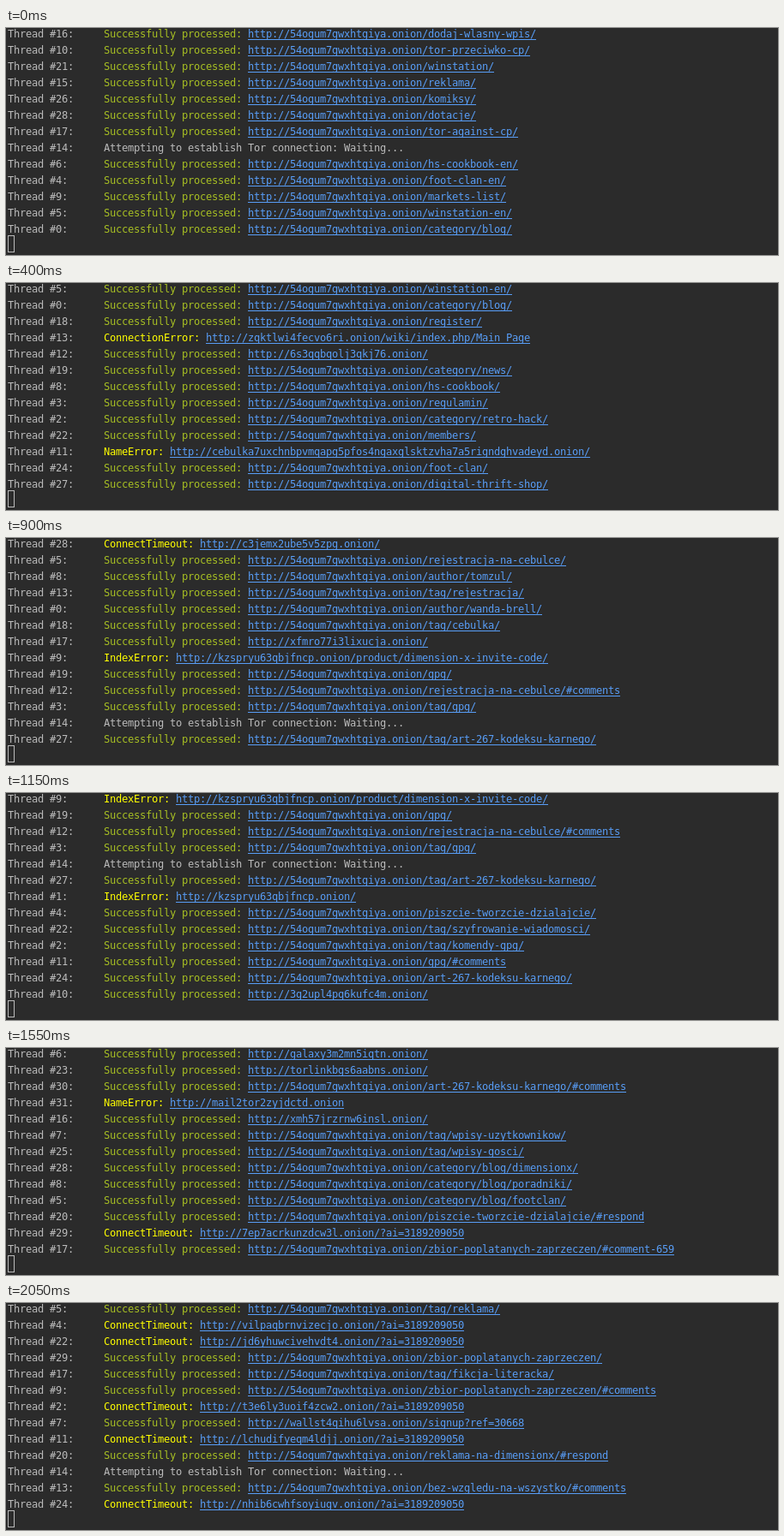
An HTML page that plays this animation: 900x265 px, repeating every 2100 ms.

```html
<!DOCTYPE html>
<html lang="en">
<head>
<meta charset="utf-8">
<title>Crawler log</title>
<style>
  html, body { margin: 0; width: 100%; height: 100%; overflow: hidden; background: #2b2b2b; }
  #screen { position: absolute; left: 0; top: 0; width: 900px; height: 247px; overflow: hidden; }
  #log {
    position: absolute; left: 2px; top: 0;
    font: 12px/14px "DejaVu Sans Mono", monospace;
    letter-spacing: calc(7px - 1ch); /* 7px terminal cells */
    font-variant-ligatures: none;
    white-space: pre; color: #bbb;
  }
  .row { height: 19px; }
  .ok { color: #a8c023; }
  .error { color: #ff0; }
  .link {
    color: #589df6;
    text-decoration: underline 1px;
    text-underline-offset: 2px;
    text-decoration-skip-ink: none;
  }
  #cursor {
    position: absolute; left: 2px; top: 242px; width: 8px; height: 20px;
    box-sizing: border-box; border: 1px solid #bbb;
  }
</style>
</head>
<body>
<div id="screen"><div id="log"></div></div>
<div id="cursor"></div>
<script>
  const ROW = 19, TICK = 50, LOOP = 2100;
  const HOST = "54ogum7gwxhtgiya.onion";

  // thread [error] address; a leading slash means HOST, no address means waiting
  const entries = `16 /dodaj-wlasny-wpis/
10 /tor-przeciwko-cp/
21 /winstation/
15 /reklama/
26 /komiksy/
28 /dotacje/
17 /tor-against-cp/
14
6 /hs-cookbook-en/
4 /foot-clan-en/
9 /markets-list/
5 /winstation-en/
0 /category/blog/
18 /register/
13 ConnectionError zqktlwi4fecvo6ri.onion/wiki/index.php/Main_Page
12 6s3qqbqolj3qkj76.onion/
19 /category/news/
8 /hs-cookbook/
3 /regulamin/
2 /category/retro-hack/
22 /members/
11 NameError cebulka7uxchnbpvmqapg5pfos4ngaxglsktzvha7a5rigndghvadeyd.onion/
24 /foot-clan/
27 /digital-thrift-shop/
21 /category/komiksy/
15 /tag/winstation/
26 /author/redakcja/
6 /rejestracja-na-cebulce/#comment-632
28 ConnectTimeout c3jemx2ube5v5zpg.onion/
5 /rejestracja-na-cebulce/
8 /author/tomzul/
13 /tag/rejestracja/
0 /author/wanda-brell/
18 /tag/cebulka/
17 xfmro77i3lixucja.onion/
9 IndexError kzspryu63qbjfncp.onion/product/dimension-x-invite-code/
19 /gpg/
12 /rejestracja-na-cebulce/#comments
3 /tag/gpg/
14
27 /tag/art-267-kodeksu-karnego/
1 IndexError kzspryu63qbjfncp.onion/
4 /piszcie-tworzcie-dzialajcie/
22 /tag/szyfrowanie-wiadomosci/
2 /tag/komendy-gpg/
11 /gpg/#comments
24 /art-267-kodeksu-karnego/
10 3g2upl4pq6kufc4m.onion/
26 /tag/reporterka-wanda/
6 galaxy3m2mn5iqtn.onion/
23 torlinkbgs6aabns.onion/
30 /art-267-kodeksu-karnego/#comments
31 NameError mail2tor2zyjdctd.onion
16 xmh57jrzrnw6insl.onion/
7 /tag/wpisy-uzytkownikow/
25 /tag/wpisy-gosci/
28 /category/blog/dimensionx/
8 /category/blog/poradniki/
5 /category/blog/footclan/
20 /piszcie-tworzcie-dzialajcie/#respond
29 ConnectTimeout 7ep7acrkunzdcw3l.onion/?ai=3189209050
17 /zbior-poplatanych-zaprzeczen/#comment-659
9 /zbior-poplatanych-zaprzeczen/#comment-650
0 /zbior-poplatanych-zaprzeczen/#comment-663
18 /zbior-poplatanych-zaprzeczen/#comment-660
13 /zbior-poplatanych-zaprzeczen/#comment-665
19 /bez-wzgledu-na-wszystko/#comment-613
3 /pawnshop/
1 IndexError kzspryu63qbjfncp.onion/product/hidden-service-cookbook/
5 /tag/reklama/
4 ConnectTimeout vilpaqbrnvizecjo.onion/?ai=3189209050
22 ConnectTimeout jd6yhuwcivehvdt4.onion/?ai=3189209050
29 /zbior-poplatanych-zaprzeczen/
17 /tag/fikcja-literacka/
9 /zbior-poplatanych-zaprzeczen/#comments
2 ConnectTimeout t3e6ly3uoif4zcw2.onion/?ai=3189209050
7 wallst4qihu6lvsa.onion/signup?ref=30668
11 ConnectTimeout lchudifyeqm4ldjj.onion/?ai=3189209050
20 /reklama-na-dimensionx/#respond
14
13 /bez-wzgledu-na-wszystko/#comments
24 ConnectTimeout nhib6cwhfsoyiugv.onion/?ai=3189209050`.split("\n");

  // New lines printed at each tick
  const printed = "0" + "11211212" + "1110" + "1" + "32323" + "12121" + "21212" + "2221222" + "222223";
  let total = 0;
  const scroll = [...printed].map(n => total += +n);

  function span(cls, text) {
    const el = document.createElement("span");
    el.className = cls;
    el.textContent = text;
    return el;
  }

  function makeRow(entry) {
    const [thread, ...rest] = entry.split(" ");
    const address = rest.pop(), error = rest.pop();
    const row = document.createElement("div");
    row.className = "row";
    row.append(`Thread #${thread}:`.padEnd(16));
    if (!address) {
      row.append("Attempting to establish Tor connection: Waiting...");
    } else {
      const url = "http://" + (address[0] === "/" ? HOST : "") + address;
      row.append(error ? span("error", error + ": ") : span("ok", "Successfully processed: "),
                 span("link", url));
    }
    return row;
  }

  const log = document.getElementById("log");
  log.append(...entries.map(makeRow));

  const start = performance.now();
  function draw() {
    const t = (performance.now() - start) % LOOP;
    log.style.top = -ROW * scroll[Math.floor(t / TICK)] + "px";
    requestAnimationFrame(draw);
  }
  draw();
</script>
</body>
</html>
```
